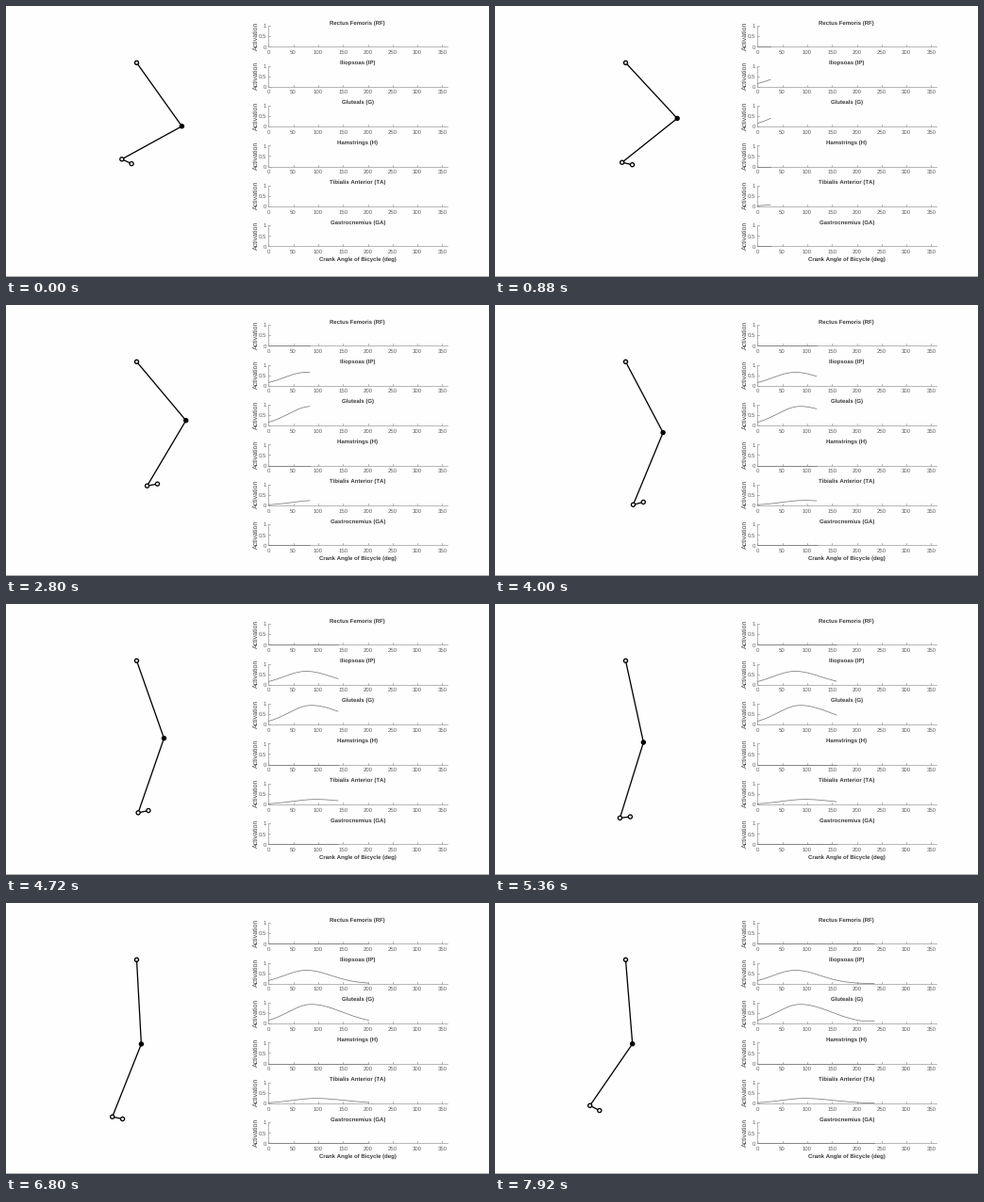
A matplotlib script for the animation above (8 s loop, 512 by 288 pixels).

```python
import numpy as np
import matplotlib.pyplot as plt
from matplotlib.animation import FuncAnimation

W, H, FRAMES, STEP = 512, 288, 100, 80
PX = 0.72  # points per pixel at 100 dpi
RATE = 2.375  # crank degrees per frame
X0, DEG = 278.3, 0.526  # left end of the angle axes, pixels per degree
TOP, ROW_GAP, HEIGHT = 43.3, 42.42, 22.2
INK, TICK_INK, AXIS, TRACE = "#3c3c3c", "#606060", "#a0a0a0", "#787878"

plt.rcParams.update({"font.family": "Liberation Sans", "text.hinting": "none",
                     "text.hinting_factor": 1})

# Leg geometry in pixels; horizontal distances are squeezed
HIP, CRANK = np.array([138.5, 60.3]), np.array([122.8, 196.2])
SQUEEZE = np.array([0.809, 1])
THIGH, SHANK, FOOT, CRANK_ARM = 89.8, 86.1, 13.6, 33.4


def reach(start, length, angle):
    """End of a limb; the angle is measured from straight down."""
    return start + length * SQUEEZE * [np.sin(angle), np.cos(angle)]


def leg(crank):
    """Hip, knee, ankle and toe while the ankle rides on the crank."""
    ankle = reach(CRANK, CRANK_ARM, np.pi - crank)
    dx, dy = (ankle - HIP) / SQUEEZE
    dist = np.hypot(dx, dy)
    bend = np.arccos((THIGH**2 + dist**2 - SHANK**2) / (2 * THIGH * dist))
    knee = reach(HIP, THIGH, np.arctan2(dx, dy) + bend)
    tilt = np.radians(79 + 23 * np.cos(crank - np.radians(115)))
    return np.array([HIP, knee, ankle, reach(ankle, FOOT, tilt)])


theta = np.linspace(0, 240, 481)


def bell(peak, center, rise, fall, floor=0):
    spread = np.where(theta < center, rise, fall)
    return np.maximum(peak * np.exp(-((theta - center) / spread) ** 2 / 2), floor)


SILENT = 0 * theta
MUSCLES = [
    ("Rectus Femoris (RF)", SILENT),
    ("Iliopsoas (IP)", bell(0.64, 76, 44.5, 50.5)),
    ("Gluteals (G)", bell(0.92, 86, 46, 62, 0.13)),
    ("Hamstrings (H)", SILENT),
    ("Tibialis Anterior (TA)", bell(0.24, 95, 47, 58)),
    ("Gastrocnemius (GA)", SILENT),
]

fig = plt.figure(figsize=(W / 100, H / 100), dpi=100, facecolor="#fefefe")
ax = fig.add_axes([0, 0, 1, 1])
ax.set_xlim(0, W)
ax.set_ylim(H, 0)
ax.axis("off")


def line(xs, ys, color=AXIS, width=0.75, **kw):
    return ax.plot(xs, ys, color=color, lw=width * PX, **kw)[0]


def label(x, y, text, size=6.1, weight="bold", color=INK, ha="center",
          va="center_baseline", **kw):
    ax.text(x, y, text, fontsize=size * PX, weight=weight, color=color,
            ha=ha, va=va, **kw)


def tick_label(x, y, text, **kw):
    label(x, y, text, 5.6, "normal", TICK_INK, **kw)


def panel(base, title):
    line([X0, X0 + 360 * DEG], [base, base])
    line([X0, X0], [base, base - HEIGHT])
    for deg in range(0, 351, 50):
        x = X0 + deg * DEG
        line([x, x], [base, base - 2])
        tick_label(x, base + 5.5, str(deg))
    for value in (0, 0.5, 1):
        y = base - value * HEIGHT
        line([X0, X0 + 2], [y, y])
        tick_label(X0 - 2.6, y, f"{value:g}", ha="right")
    label(372.8, base - 26.2, title)
    label(265.5, base - 11.8, "Activation", 6.7, "normal", va="center",
          rotation=90)


traces = []
for row, (title, _) in enumerate(MUSCLES):
    panel(TOP + row * ROW_GAP, title)
    traces.append(line([], [], TRACE))
label(372.5, 268.4, "Crank Angle of Bicycle (deg)")
ax.axhspan(H - 1, H, color="#b0b0b0", lw=0)

bones = line([], [], "black", 1.3, zorder=4)
joints = ax.scatter(*leg(0).T, s=(4.1 * PX) ** 2, lw=1.3 * PX, zorder=5,
                    edgecolors="black",
                    facecolors=["#d8d8d8", "black", "white", "white"])


def draw(n):
    angle = RATE * n
    points = leg(np.radians(angle))
    bones.set_data(*points.T)
    joints.set_offsets(points)
    shown = theta < angle
    for row, (trace, (_, level)) in enumerate(zip(traces, MUSCLES)):
        trace.set_data(X0 + theta[shown] * DEG,
                       TOP + row * ROW_GAP - level[shown] * HEIGHT)
    return [bones, joints, *traces]


anim = FuncAnimation(fig, draw, frames=FRAMES, interval=STEP, repeat=True,
                     repeat_delay=0, blit=False)
plt.show()
```
